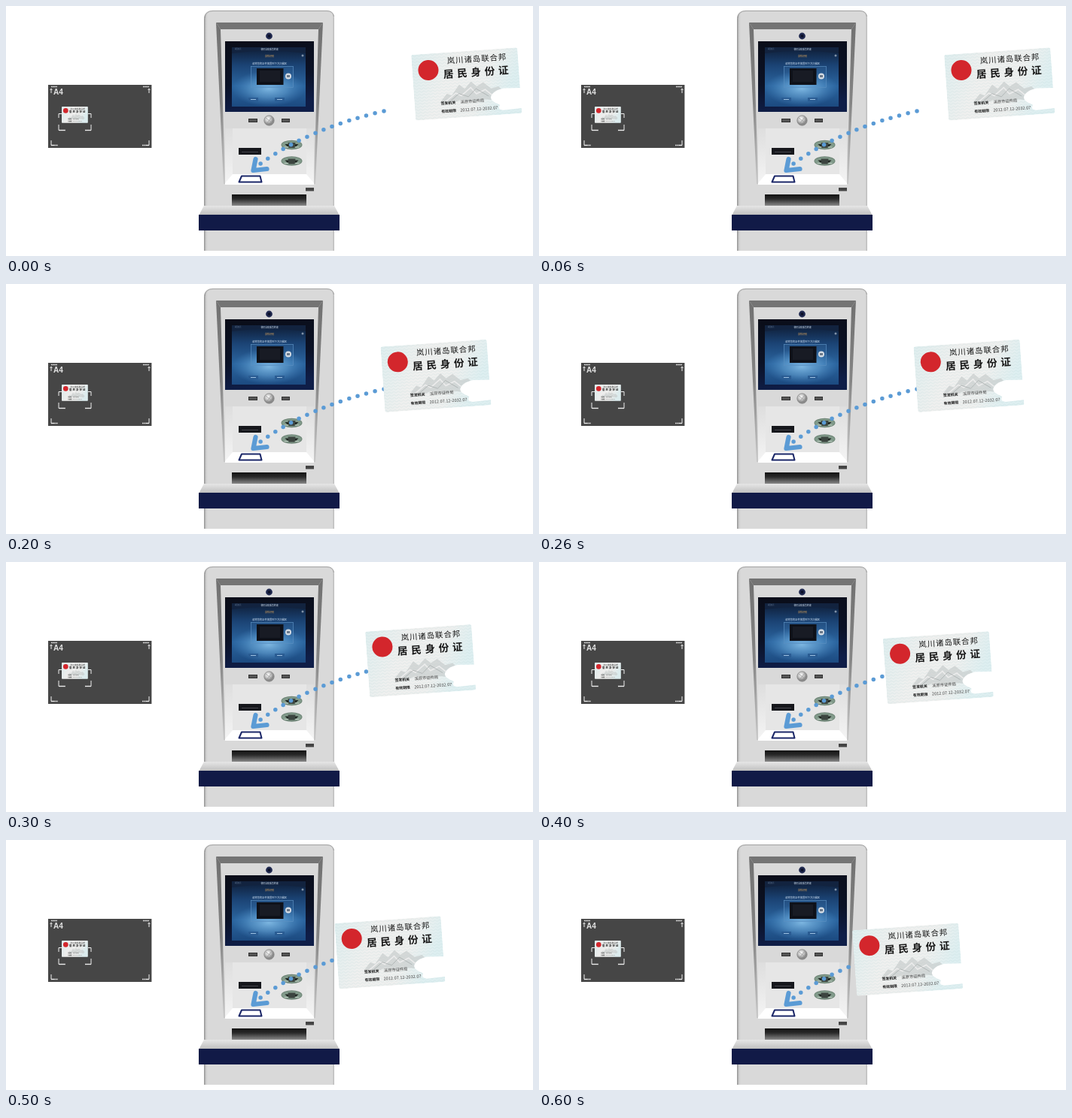
These frames come from a looping animation (700 px wide and 333 px high, 700 ms). An HTML page:

```html
<!DOCTYPE html>
<html lang="zh">
<head>
<meta charset="utf-8">
<title>Card kiosk</title>
<style>
html, body { margin: 0; width: 100%; height: 100%; overflow: hidden; background: #fff; }
svg { display: block; width: 700px; height: 333px; }
text { font-family: "Noto Sans CJK SC", "Noto Sans CJK", sans-serif; }
</style>
</head>
<body>
<svg viewBox="0 0 700 333">
<defs>
  <linearGradient id="body"><stop offset="0" stop-color="#8e8e8e"/><stop offset=".016" stop-color="#d0d0d0"/><stop offset=".03" stop-color="#d9d9d9"/><stop offset=".985" stop-color="#d9d9d9"/><stop offset="1" stop-color="#b8b8b8"/></linearGradient>
  <linearGradient id="side" x2="0" y2="1"><stop offset="0" stop-color="#707070"/><stop offset=".5" stop-color="#858585"/><stop offset="1" stop-color="#c8c8c8"/></linearGradient>
  <linearGradient id="bezel" x2=".2" y2="1"><stop offset="0" stop-color="#0a0d18"/><stop offset=".6" stop-color="#0b1226"/><stop offset="1" stop-color="#0f1e48"/></linearGradient>
  <linearGradient id="screen" x2="0" y2="1"><stop offset="0" stop-color="#0e1d36"/><stop offset=".3" stop-color="#1b4374"/><stop offset=".65" stop-color="#2b659f"/><stop offset="1" stop-color="#1c4a80"/></linearGradient>
  <radialGradient id="glow"><stop offset="0" stop-color="#86bfe8" stop-opacity=".9"/><stop offset=".5" stop-color="#6aa9da" stop-opacity=".55"/><stop offset="1" stop-color="#4a8cc8" stop-opacity="0"/></radialGradient>
  <linearGradient id="wall" x2="0" y2="1"><stop offset="0" stop-color="#dedede"/><stop offset="1" stop-color="#f4f4f4"/></linearGradient>
  <linearGradient id="slot" x2="0" y2="1"><stop offset="0" stop-color="#131313"/><stop offset=".4" stop-color="#2a2a2a"/><stop offset="1" stop-color="#888"/></linearGradient>
  <linearGradient id="ledge" x2="0" y2="1"><stop offset="0" stop-color="#e6e6e6"/><stop offset="1" stop-color="#bdbdbd"/></linearGradient>
  <radialGradient id="knob" cx=".4" cy=".35"><stop offset="0" stop-color="#fff"/><stop offset=".6" stop-color="#c4c4c4"/><stop offset="1" stop-color="#888"/></radialGradient>
  <linearGradient id="paper" x2="1" y2=".3"><stop offset="0" stop-color="#dfeeef"/><stop offset=".4" stop-color="#f0f0ef"/><stop offset=".75" stop-color="#eff0ef"/><stop offset="1" stop-color="#deeff1"/></linearGradient>
  <pattern id="waves" width="6" height="4" patternUnits="userSpaceOnUse"><path d="M0 2Q1.5 0 3 2T6 2" fill="none" stroke="#b3cfcf" stroke-width=".5" opacity=".55"/></pattern>
  <clipPath id="torn"><path d="M2 0H139Q141.5 0 141.5 3V54L120 53C108 54 100 61 102 66C104 71 110 72 113 75C110 79 112 81 117 82L141.5 81V88H3Q0 88 0 85V2Q0 0 2 0Z"/></clipPath>
  <g id="oval"><ellipse rx="14" ry="6.2" fill="#6f8577"/><ellipse rx="13" ry="5" fill="#829b8b"/><path d="M-9-1H9L6 2H-6Z" fill="#202723"/><path d="M-5-3H5L4 4H-4Z" fill="#3c4540"/><path d="M-10 3H-5M5 3H10" stroke="#c2d0c6"/></g>
  <g id="card">
    <rect width="141.5" height="88" rx="3" fill="url(#paper)"/>
    <rect width="141.5" height="88" rx="3" fill="url(#waves)"/>
    <path d="M34 66L44 55L50 58L61 44L68 50L77 41L84 48L93 43L103 52L113 50L124 62L118 70L94 66L80 69L63 64L48 69Z" fill="#c3c8c8" opacity=".6"/>
    <path d="M41 66L56 55L63 59L76 49L83 58L95 53L108 65" fill="none" stroke="#ececec" stroke-width="1.6"/>
    <path d="M48 65L60 56L72 61L83 51L99 62" fill="none" stroke="#a5abab" stroke-width=".7"/>
    <circle cx="21.5" cy="22" r="13.5" fill="#d3262c"/>
    <g fill="#171717" font-weight="700">
      <text x="47" y="15.2" font-size="10.4" letter-spacing="1" font-weight="500">岚川诸岛联合邦</text>
      <text x="41" y="34" font-size="13.6" letter-spacing="4.7">居民身份证</text>
      <g font-size="4.9">
        <text x="35" y="69.2">签发机关</text>
        <text x="35" y="80">有效期限</text>
      </g>
      <g font-weight="400" fill="#444">
        <text x="61" y="69.2" font-size="5.3">溪原市证件局</text>
        <text x="60" y="80.2" font-size="5.6">2012.07.12-2032.07</text>
      </g>
    </g>
  </g>
</defs>

<!-- Scan preview -->
<rect x="56" y="105" width="137.400" height="84" fill="#464646"/>
<text x="63" y="118" font-size="10" font-weight="700" fill="#e4e4e4" style="font-family:'Liberation Sans',sans-serif">A4</text>
<g fill="none" stroke="#eee">
  <path d="M60 116V110M190 116V110M60 179V185.500H64M190 179V185.500H186M70 149V143.500H74M113 149V143.500H109M70 158V165.500H78M113 158V165.500H106"/>
  <path d="M60 107.500H68M182 107.500H190M60 185.500H69M181 185.500H190M71 165.500H79M105 165.500H113" stroke-width="1.6" stroke-dasharray="1.5 .6"/>
  <path d="M58.500 112L60 110L61.500 112M188.500 112L190 110L191.500 112" stroke-width=".8"/>
</g>
<use href="#card" transform="translate(74 134) scale(.246)"/>

<!-- Kiosk -->
<path d="M263 326V18Q263 6 274 6H427Q436 6 436 16V326Z" fill="url(#body)"/>
<path d="M264 16Q265 6.500 275 6.500H426Q434 6.500 435.500 14" fill="none" stroke="#a0a0a0"/>
<path d="M279 22H421L415 31H285Z" fill="#747474"/>
<path d="M279 22L285 31L291 237H289Z" fill="url(#side)"/>
<path d="M421 22L415 31L409 237H411Z" fill="url(#side)"/>
<circle cx="349.500" cy="40" r="4.400" fill="#20294f"/><circle cx="349.500" cy="40" r="2" fill="#0b1028"/>
<rect x="291" y="47" width="118" height="94" fill="url(#bezel)"/>
<rect x="300" y="55" width="98" height="79" fill="url(#screen)"/>
<ellipse cx="349" cy="110" rx="49" ry="24" fill="url(#glow)"/>
<path d="M300 55H398V63Q349 56 300 63Z" fill="#12233f"/>
<g fill="#d5e4f4" font-size="2.900" text-anchor="middle">
  <text x="350" y="59">便民自助服务终端</text>
  <text x="350" y="77.500" font-size="3.300">请将您的证件放置到下方扫描区</text>
  <text x="350" y="67.600" fill="#f0b05c" font-size="3">身份识别</text>
  <text x="308" y="57.500" font-size="2.200" fill="#71849f">返回首页</text>
</g>
<circle cx="394" cy="66" r="1.500" fill="#8193a9"/>
<rect x="325.500" y="80.500" width="56" height="28" fill="#5a9bd6" fill-opacity=".12" stroke="#5b8fc0" stroke-width=".7"/>
<rect x="333" y="83" width="35.500" height="22" fill="#0e1119"/>
<rect x="337" y="86" width="27" height="15" fill="#181b24"/>
<circle cx="375" cy="93.500" r="4" fill="#d5dce4"/><path d="M373 92H377V95H373Z" fill="#6c7a8b"/>
<path d="M322 124.500H335M357 124.500H370" stroke="#2a5c93" stroke-width="5"/>
<path d="M325 124.500H332M360 124.500H367" stroke="#9cbfe0" stroke-width="1.200"/>
<g fill="#555" stroke="#333"><rect x="322.500" y="150.500" width="11" height="4"/><rect x="366.500" y="150.500" width="10" height="4"/></g>
<circle cx="349.500" cy="152.500" r="6.700" fill="url(#knob)" stroke="#8b8b8b" stroke-width=".8"/>
<path d="M345 149L354 156M353 148L346 157" stroke="#999" stroke-width=".8"/>

<!-- Tray -->
<rect x="291" y="163" width="118" height="75" fill="#fff"/>
<path d="M291 163H301V224L291 236Z" fill="url(#wall)"/>
<path d="M409 163H399V224L409 236Z" fill="url(#wall)"/>
<rect x="301" y="163" width="98" height="61" fill="#e6e6e6"/>
<rect x="309" y="189" width="30" height="9" fill="#16171c"/><path d="M313 194.500H335" stroke="#43434a"/>
<use href="#oval" x="379.500" y="185"/>
<use href="#oval" x="379.500" y="206.500"/>
<path d="M313 226.500H337.500L339.500 234.500H309.500Z" fill="#fff" stroke="#1b2768" stroke-width="2" stroke-linejoin="round"/>
<rect x="398" y="242" width="11" height="4.500" fill="#444"/>
<rect x="300" y="251" width="99" height="15" fill="url(#slot)"/>
<path d="M263 266H436L443 279H256Z" fill="url(#ledge)"/>
<rect x="256" y="278" width="187" height="21" fill="#111a47"/>

<!-- Insert direction -->
<g fill="none" stroke="#5b9bd5" stroke-linecap="round" stroke-linejoin="round">
  <path d="M502 140Q404 162.600 338 210" pathLength="15.010" stroke-dasharray="0 1" stroke-width="5.500"/>
  <path d="M331.500 204L328.500 219L346.500 217" stroke-width="6.200"/>
</g>

<g id="mover"><g clip-path="url(#torn)"><use href="#card"/></g></g>
</svg>
<script>
const mover = document.getElementById("mover");
const LOOP = 700, STEP = 100;

// The card advances in even jumps along a straight line.
function draw(now) {
  const n = Math.floor(now % LOOP / STEP);
  mover.setAttribute("transform", `translate(${538 - 20.35 * n} ${65 + 9.2 * n}) rotate(-4)`);
  requestAnimationFrame(draw);
}
draw(0);
</script>
</body>
</html>
```
